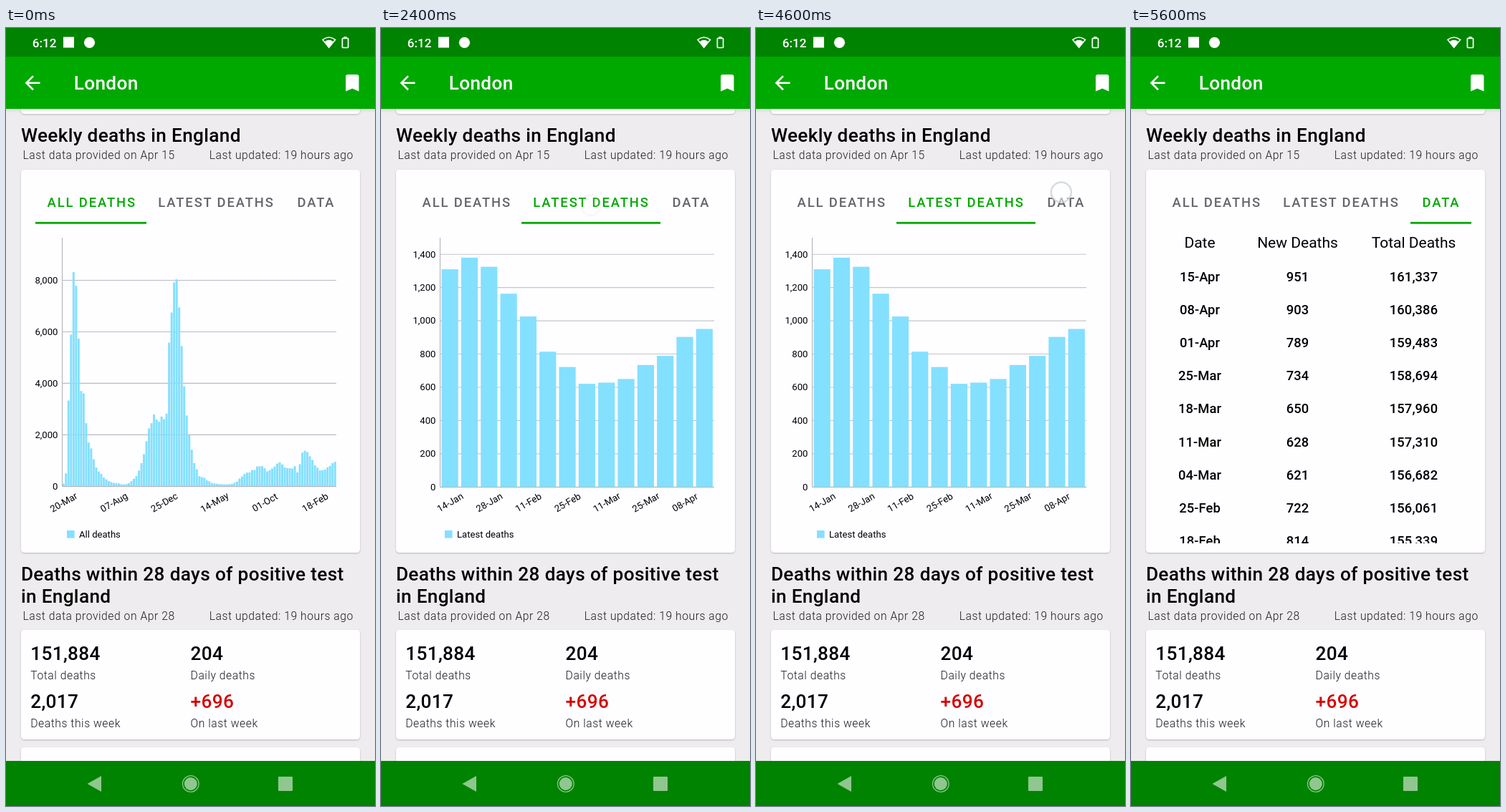
An HTML page for the animation above (9400 ms loop, 515 by 1087 pixels).

```html
<!DOCTYPE html>
<html lang="en">
<head>
<meta charset="utf-8">
<title>Weekly deaths</title>
<style>
  html, body { margin: 0; width: 100%; height: 100%; overflow: hidden; background: #eeecee; }
  svg { display: block; width: 100vw; height: 100vh; font-family: Roboto, sans-serif; }
  .h { font-size: 26.2px; font-weight: 500; letter-spacing: .33px; }
  .cap { font-size: 15.7px; font-weight: 300; letter-spacing: .54px; fill: #1c1c1c; }
  .tab { font-size: 18.4px; font-weight: 500; letter-spacing: 1.87px; }
  .th { font-size: 21px; text-anchor: middle; }
  .td { font-size: 18.34px; font-weight: 500; letter-spacing: .13px; text-anchor: middle; }
  .ax { font-size: 13.1px; }
  .card { fill: #fefdff; filter: drop-shadow(0 1.2px 1px rgba(0, 0, 0, .22)); }
</style>
</head>
<body>
<svg id="stage" viewBox="0 0 515 1087" preserveAspectRatio="none">
  <defs>
    <clipPath id="pager"><rect x="34.5" y="273.8" width="446.5" height="446.2"/></clipPath>
    <linearGradient id="shade" x2="0" y2="1">
      <stop stop-opacity=".07"/><stop offset="1" stop-opacity="0"/>
    </linearGradient>
  </defs>
  <rect width="515" height="1087" fill="#eeecee"/>
  <g id="cards"></g>
  <g id="copy"></g>
  <g id="tabs"></g>
  <rect id="bar" y="270.9" height="2.8" fill="#00a900"/>
  <g clip-path="url(#pager)"><g id="pages"></g></g>
  <circle id="touch" r="14" fill="#fff" fill-opacity=".65" stroke-width="2.6"/>

  <rect y="113" width="515" height="6" fill="url(#shade)"/>
  <rect width="515" height="40" fill="#008300"/>
  <rect y="40" width="515" height="73" fill="#00a900"/>
  <rect y="1024" width="515" height="63" fill="#008300"/>
  <g fill="#fff">
    <text x="36.8" y="26.6" font-size="17.1" font-weight="500">6:12</text>
    <rect x="80" y="12.5" width="15" height="15"/>
    <circle cx="116.5" cy="20.3" r="7.6"/>
    <path d="M442 16.3Q450.7 9.5 459.6 16.3L450.7 27.2Z" fill="none" stroke="#fff" stroke-width="1.5"/>
    <path d="M444.6 19.2Q450.7 14.4 457 19.2L450.7 27Z"/>
    <path d="M471.5 12h4v2h-4z"/>
    <rect x="469.4" y="14.3" width="8.2" height="13.2" rx="1" fill="none" stroke="#fff" stroke-width="1.7"/>
    <path transform="translate(21.3 61) scale(1.31)" d="M20 11H7.83l5.59-5.59L12 4l-8 8 8 8 1.41-1.41L7.83 13H20z"/>
    <text class="h" x="94.7" y="86.3">London</text>
    <path transform="translate(467.6 61) scale(1.31)" d="M17 3H7c-1.1 0-2 .9-2 2v16l7-3 7 3V5c0-1.1-.9-2-2-2z"/>
  </g>
  <g fill="#8fc78f">
    <path d="M113.5 1056L133 1045v22z"/>
    <circle cx="257.8" cy="1056" r="9"/>
    <circle cx="257.8" cy="1056" r="11.3" fill="none" stroke="#8fc78f" stroke-width="1.3"/>
    <rect x="380" y="1046" width="20" height="20" rx="1"/>
  </g>
</svg>
<script>
const NS = 'http://www.w3.org/2000/svg';
const $ = id => document.getElementById(id);
const LOOP = 9400, STEP = 100, PAGE = 446;

function add(parent, tag, attrs, text) {
  const el = document.createElementNS(NS, tag);
  for (const k in attrs) el.setAttribute(k, attrs[k]);
  if (text !== undefined) el.textContent = text;
  parent.appendChild(el);
  return el;
}
const label = (parent, cls, x, y, text, more) =>
  add(parent, 'text', { class: cls, x, y, ...more }, text);
const commas = n => n.toLocaleString('en-US');

// Static page content
for (const [y, h] of [[90, 30], [198, 535], [841, 153], [1005, 60]])
  add($('cards'), 'rect', { class: 'card', x: 21, y, width: 473, height: h, rx: 4.5 });

const copy = $('copy');
label(copy, 'h', 20.9, 159, 'Weekly deaths in England');
label(copy, 'h', 20.9, 772.3, 'Deaths within 28 days of positive test');
label(copy, 'h', 20.9, 802.5, 'in England');
for (const [y, day] of [[183, 'Apr 15'], [826.5, 'Apr 28']]) {
  label(copy, 'cap', 23.5, y, 'Last data provided on ' + day);
  label(copy, 'cap', 283.7, y, 'Last updated: 19 hours ago');
}
const facts = [['151,884', 'Total deaths'], ['204', 'Daily deaths'],
               ['2,017', 'Deaths this week'], ['+696', 'On last week']];
facts.forEach(([value, name], i) => {
  const x = i % 2 ? 257.6 : 34.3, y = 882.9 + 67.1 * (i >> 1);
  label(copy, 'h', x, y, value, { fill: i === 3 ? '#d50000' : '#000' });
  label(copy, 'cap', x, y + 26.8, name);
});

const tabs = [['ALL DEATHS', 57.6, 41, 196], ['LATEST DEATHS', 212.3, 196, 390], ['DATA', 406.5, 390, 475]];
const tabText = tabs.map(([name, x]) => label($('tabs'), 'tab', x, 249.6, name));

// Weekly counts
const latest = [1310, 1380, 1325, 1163, 1026, 814, 722, 621, 628, 650, 734, 789, 903, 951];
const earlier = [
  100, 500, 3330, 5890, 8320, 7790, 5730, 3700, 3610, 2450, 1700, 1470, 1050, 730, 570, 480, 340, 270, 200,
  165, 130, 120, 110, 80, 70, 85, 120, 200, 290, 400, 610, 900, 1250, 1750, 2250, 2450, 2790, 2590, 2510,
  2710, 2610, 2820, 5580, 6750, 7920, 8040, 6950, 5450, 3880, 2750, 1980, 1420, 900, 660, 390, 360, 330,
  230, 195, 130, 110, 95, 85, 80, 75, 75, 80, 95, 140, 180, 300, 380, 480, 530, 540, 630, 630, 770, 780,
  780, 700, 580, 630, 690, 770, 880, 930, 850, 730, 710, 700, 690, 780, 540, 860];

const LEFT = 78.5, RIGHT = 461;

function chart(page, { values, name, zero, unit, tick, count, days, every, grid }) {
  const g = add($('pages'), 'g', { transform: `translate(${page * PAGE} 0)` });
  const step = (RIGHT - LEFT) / values.length;
  for (let i = 0; i <= count; i++) {
    const y = zero - i * tick * unit;
    add(g, 'path', { d: `M${LEFT} ${y}H${RIGHT}`, stroke: grid, 'stroke-width': 1.1 });
    label(g, 'ax', 72.4, y + 4.3, commas(i * tick), { 'text-anchor': 'end' });
  }
  add(g, 'path', { d: `M${LEFT} 293V${zero}`, stroke: '#b4b4b6', 'stroke-width': 1.1 });
  values.forEach((v, i) => add(g, 'rect', {
    x: LEFT + step * (i + .075), y: zero - v * unit, width: step * .85, height: v * unit, fill: '#84e0ff'
  }));
  add(g, 'path', { d: `M${LEFT} ${zero + .4}H${RIGHT}`, stroke: '#b4b4b6', 'stroke-width': 1 });
  days.forEach((day, i) => {
    const x = LEFT + step * (.5 + i * every);
    label(g, 'ax', 0, 4.5, day, { 'text-anchor': 'middle', transform: `translate(${x + .3} 662.8) rotate(-30)` });
  });
  add(g, 'rect', { x: 85, y: 702, width: 10.6, height: 10.6, fill: '#84e0ff' });
  label(g, 'ax', 102, 712.2, name);
}

chart(0, {
  values: earlier.concat(latest), name: 'All deaths', zero: 640.3, unit: .03597, tick: 2000, count: 4,
  days: ['20-Mar', '07-Aug', '25-Dec', '14-May', '01-Oct', '18-Feb'], every: 20, grid: '#bab9c2'
});
chart(1, {
  values: latest, name: 'Latest deaths', zero: 641.3, unit: .2322, tick: 200, count: 7,
  days: ['14-Jan', '28-Jan', '11-Feb', '25-Feb', '11-Mar', '25-Mar', '08-Apr'], every: 2, grid: '#c6c5c8'
});

// Data table, newest week first
const table = add($('pages'), 'g', { transform: `translate(${2 * PAGE} 0)` });
const cols = [96, 232.5, 394.5];
['Date', 'New Deaths', 'Total Deaths'].forEach((s, i) => label(table, 'th', cols[i], 306.8, s));
const weeks = ['15-Apr', '08-Apr', '01-Apr', '25-Mar', '18-Mar', '11-Mar', '04-Mar', '25-Feb', '18-Feb'];
let total = 161337;
weeks.forEach((day, i) => {
  const n = latest[latest.length - 1 - i];
  [day, n, commas(total)].forEach((s, c) => label(table, 'td', cols[c], 353.5 + 46.22 * i, s));
  total -= n;
});

// Each tap shows a touch ring and slides the pager one page
const taps = [
  { at: 2200, slide: 2217, x: 293, y: 247.5, ring: [1, .6, .15], edge: '#cfcdd0' },
  { at: 4600, slide: 4752, x: 426, y: 229.5, ring: [.8, .9, .6, .15], edge: '#ccd6da' }
];
const clamp = u => Math.min(1, Math.max(0, u));
const slideEase = u => 1 - (1 - clamp(u)) ** 5;

function draw(ms) {
  const t = Math.floor((ms % LOOP) / STEP) * STEP;
  let pos = 0, tab = 0, ring = 0;
  for (const tap of taps) {
    pos += slideEase((t - tap.slide) / 300);
    if (t > tap.slide) tab++;
    const alpha = tap.ring[(t - tap.at) / STEP];
    if (alpha) {
      ring = alpha;
      $('touch').setAttribute('cx', tap.x);
      $('touch').setAttribute('cy', tap.y);
      $('touch').setAttribute('stroke', tap.edge);
    }
  }
  $('touch').setAttribute('opacity', ring);
  $('pages').setAttribute('transform', `translate(${-Math.round(pos * PAGE)} 0)`);
  tabText.forEach((el, i) => el.setAttribute('fill', i === tab ? '#00a900' : '#666568'));
  const [, , x0, x1] = tabs[tab];
  $('bar').setAttribute('x', x0);
  $('bar').setAttribute('width', x1 - x0);
}

function tick(now) {
  draw(now);
  requestAnimationFrame(tick);
}
draw(0);
requestAnimationFrame(tick);
</script>
</body>
</html>
```
